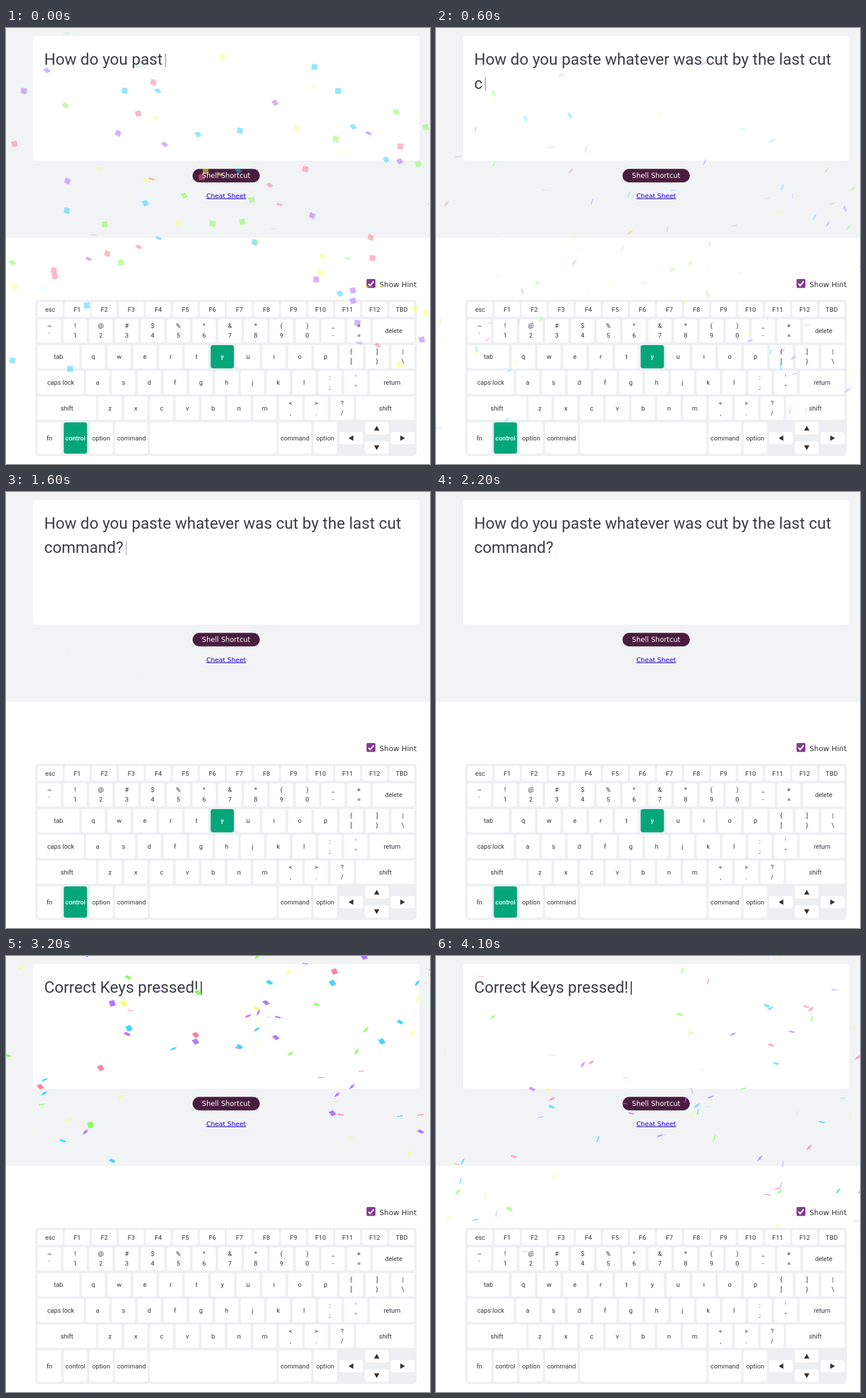
These frames come from a looping animation (738x759 px, 4200 ms). An HTML page with a canvas:

```html
<!DOCTYPE html>
<html lang="en">
<head>
<meta charset="utf-8">
<title>Shortcut trainer</title>
<style>
  html, body { margin: 0; width: 100%; height: 100%; overflow: hidden; background: #fff; }
  svg, canvas { position: absolute; left: 0; top: 0; display: block; }
  .key { font: 11.1px Roboto, sans-serif; text-anchor: middle; fill: #2f3337; }
  .ui { font-family: "DejaVu Sans", sans-serif; }
  .prompt { font: 27.7px Roboto, sans-serif; fill: #3b4145; white-space: pre; }
</style>
</head>
<body>
<svg id="stage" width="738" height="759" viewBox="0 0 738 759">
  <rect width="738" height="365.5" fill="#f1f3f5"/>
  <rect x="47" y="14" width="672.5" height="217" rx="5" fill="#fff"/>
  <text class="prompt" x="66.4" y="64.4" id="line0"></text>
  <text class="prompt" x="66.4" y="106.1" id="line1"></text>
  <rect x="324.7" y="245.3" width="117" height="23.4" rx="11.7" fill="#4a1c40"/>
  <text class="ui" x="383.2" y="260.8" font-size="12" text-anchor="middle" fill="#fff">Shell Shortcut</text>
  <text class="ui" x="383.2" y="295.7" font-size="11.2" text-anchor="middle" fill="#1c00cc" text-decoration="underline">Cheat Sheet</text>
  <rect x="627.5" y="437" width="15.5" height="15.5" rx="2" fill="#873a8f"/>
  <path d="M630.8 445.2l3.2 3.3 6-7.6" fill="none" stroke="#fff" stroke-width="2.2"/>
  <text class="ui" x="650" y="451" font-size="12.75" fill="#333">Show Hint</text>
  <rect x="51.3" y="473" width="663.7" height="272" rx="6" fill="#edf0f3"/>
</svg>
<canvas id="confetti" width="738" height="759"></canvas>
<script>
const LOOP = 4200;
const $ = id => document.getElementById(id);
const stage = $('stage');

function add(tag, attrs, text) {
  const el = document.createElementNS('http://www.w3.org/2000/svg', tag);
  for (const k in attrs) el.setAttribute(k, attrs[k]);
  if (text) el.textContent = text;
  stage.appendChild(el);
  return el;
}

// Two characters joined by a space become an upper and a lower legend.
function key(label, x, y, w, h) {
  const cap = add('rect', { x, y, width: w, height: h, rx: 4, fill: '#fff' });
  const put = (s, base) => add('text', { class: 'key', x: x + w / 2, y: base }, s);
  let text;
  if (/^\S \S$/.test(label)) {
    put(label[0], y + 15);
    put(label[2], y + 32);
  } else if (label) {
    text = put(label, y + h / 2 + 3.9);
  }
  return { cap, text };
}

const PITCH = 44.9, KEY_W = 40.4;
function row(labels, x, y) {
  return labels.map((s, i) => key(s, x + i * PITCH, y, KEY_W, 40.5));
}

'esc F1 F2 F3 F4 F5 F6 F7 F8 F9 F10 F11 F12 TBD'.split(' ')
  .forEach((s, i) => key(s, 55 + i * 47.07, 477, 43.7, 25.6));

row(['~ `', '! 1', '@ 2', '# 3', '$ 4', '% 5', '^ 6', '& 7', '* 8', '( 9', ') 0', '_ -', '+ ='], 55.2, 507);
key('delete', 638.5, 507, 72.5, 40.5);

key('tab', 55, 552, 72.5, 40.5);
const letters = row([...'qwertyuiop', '{ [', '] }', '| \\'], 131.8, 552);

key('caps lock', 55, 596.8, 80.5, 40.5);
row([...'asdfghjkl', ': ;', '\' "'], 139.4, 596.8);
key('return', 633, 596.8, 78, 40.5);

key('shift', 55, 641.6, 102, 40.5);
row([...'zxcvbnm', '< ,', '> .', '? /'], 160.8, 641.6);
key('shift', 609.4, 641.6, 101.6, 40.5);

key('fn', 55, 686.6, 41.3, 54.3);
const control = key('control', 100.6, 686.6, 40.4, 54.3);
key('option', 145.4, 686.6, 40.4, 54.3);
key('command', 190, 686.6, 56.8, 54.3);
key('', 250.5, 686.6, 220.2, 54.3);
key('command', 474.5, 686.6, 56.8, 54.3);
key('option', 535.4, 686.6, 40.6, 54.3);

// Arrow keys: centre of cap and rotation of the triangle.
[[600.5, 714, 270], [645.3, 696.7, 0], [645.3, 730.5, 180], [690.3, 714, 90]].forEach(([x, y, turn]) => {
  key('', x - 20.4, y - 10.5, 40.8, 21);
  add('path', { d: 'M-4.7 4L0-4.2 4.7 4z', fill: '#2f3337', transform: `translate(${x} ${y}) rotate(${turn})` });
});

const yKey = letters[5];
function tint(k, colour) {
  k.cap.setAttribute('fill', colour || '#fff');
  k.text.style.fill = colour ? '#fff' : '';
  k.text.style.fontWeight = colour ? 500 : 400;
}

const QUESTION = ['How do you paste whatever was cut by the last cut ', 'command?'];
const ANSWER = 'Correct Keys pressed!';
const SPEED = 0.06; // characters per ms
const ANSWER_AT = 2425;
const GREEN = '#06a67b', BLUE = '#3253dc';

const lines = [$('line0'), $('line1')].map(el => {
  const make = () => el.appendChild(document.createElementNS(el.namespaceURI, 'tspan'));
  const body = make(), cursor = make();
  cursor.textContent = '|';
  cursor.setAttribute('dx', 1.6);
  return { body, cursor };
});

const blink = (t, peak) => 0.5 + 0.5 * Math.cos((t - peak) / 400 * Math.PI);

function drawText(t) {
  let shown, alpha;
  if (t < ANSWER_AT) {
    const n = Math.floor(15 + t * SPEED + 0.01), first = QUESTION[0].length;
    shown = [QUESTION[0].slice(0, n), QUESTION[1].slice(0, Math.max(0, n - first))];
    alpha = t < 800 ? 0.42 : blink(t, 1850);
  } else {
    shown = [ANSWER.slice(0, Math.floor((t - ANSWER_AT) * SPEED)), ''];
    alpha = blink(t, 2450);
  }
  const active = shown[1] ? 1 : 0;
  lines.forEach((l, i) => {
    l.body.textContent = shown[i];
    l.cursor.setAttribute('fill-opacity', i === active ? alpha : 0);
  });
}

function random(seed) {
  return () => {
    seed = (seed * 1664525 + 1013904223) >>> 0;
    return seed / 4294967296;
  };
}

const COLOURS = ['#a864fd', '#29cdff', '#78ff44', '#ff718d', '#fdff6a'];
const LIFE = 200, SIZE = 10, FALL = 2.87, DECAY = 0.9;

function burst(start, seed) {
  const rnd = random(seed);
  const parts = Array.from({ length: 150 }, (_, i) => ({
    angle: -Math.PI * rnd(),
    speed: 22.5 + 45 * rnd(),
    wobble: 10 * rnd(),
    wobbleRate: 0.1 + 0.1 * rnd(),
    tilt: Math.PI * rnd(),
    colour: COLOURS[i % COLOURS.length]
  }));
  return { start, parts };
}

const bursts = [burst(-1700, 71), burst(2750, 2024)];
const ctx = $('confetti').getContext('2d');

// A flat square turned in space about the (1, 1, 1) axis.
function drawSquare(x, y, turn) {
  const c = Math.cos(turn), s = Math.sin(turn) / Math.sqrt(3);
  const straight = (1 + 2 * c) / 3, cross = (1 - c) / 3;
  ctx.setTransform(straight, cross + s, cross - s, straight, x, y);
  ctx.fillRect(-SIZE / 2, -SIZE / 2, SIZE, SIZE);
}

function drawConfetti(t) {
  ctx.resetTransform();
  ctx.globalAlpha = 1;
  ctx.clearRect(0, 0, 738, 759);
  for (const { start, parts } of bursts) {
    const age = (t - start) * 0.06;
    if (age <= 0 || age >= LIFE) continue;
    ctx.globalAlpha = 1 - age / LIFE;
    const reach = (1 - Math.pow(DECAY, age)) / (1 - DECAY);
    for (const p of parts) {
      const sway = p.wobble + p.wobbleRate * age;
      const x = 388 + Math.cos(p.angle) * p.speed * reach + 10 * Math.cos(sway);
      const y = 306 + Math.sin(p.angle) * p.speed * reach + FALL * age + 10 * Math.sin(sway);
      ctx.fillStyle = p.colour;
      drawSquare(x, y, p.tilt + 0.1 * age);
    }
  }
}

function draw(t) {
  drawText(t);
  tint(yKey, t < ANSWER_AT ? GREEN : '');
  tint(control, t < 2400 ? GREEN : t < 3100 ? BLUE : '');
  drawConfetti(t);
}

const origin = performance.now();
function tick() {
  draw((performance.now() - origin) % LOOP);
  requestAnimationFrame(tick);
}
draw(0);
requestAnimationFrame(tick);
</script>
</body>
</html>
```
